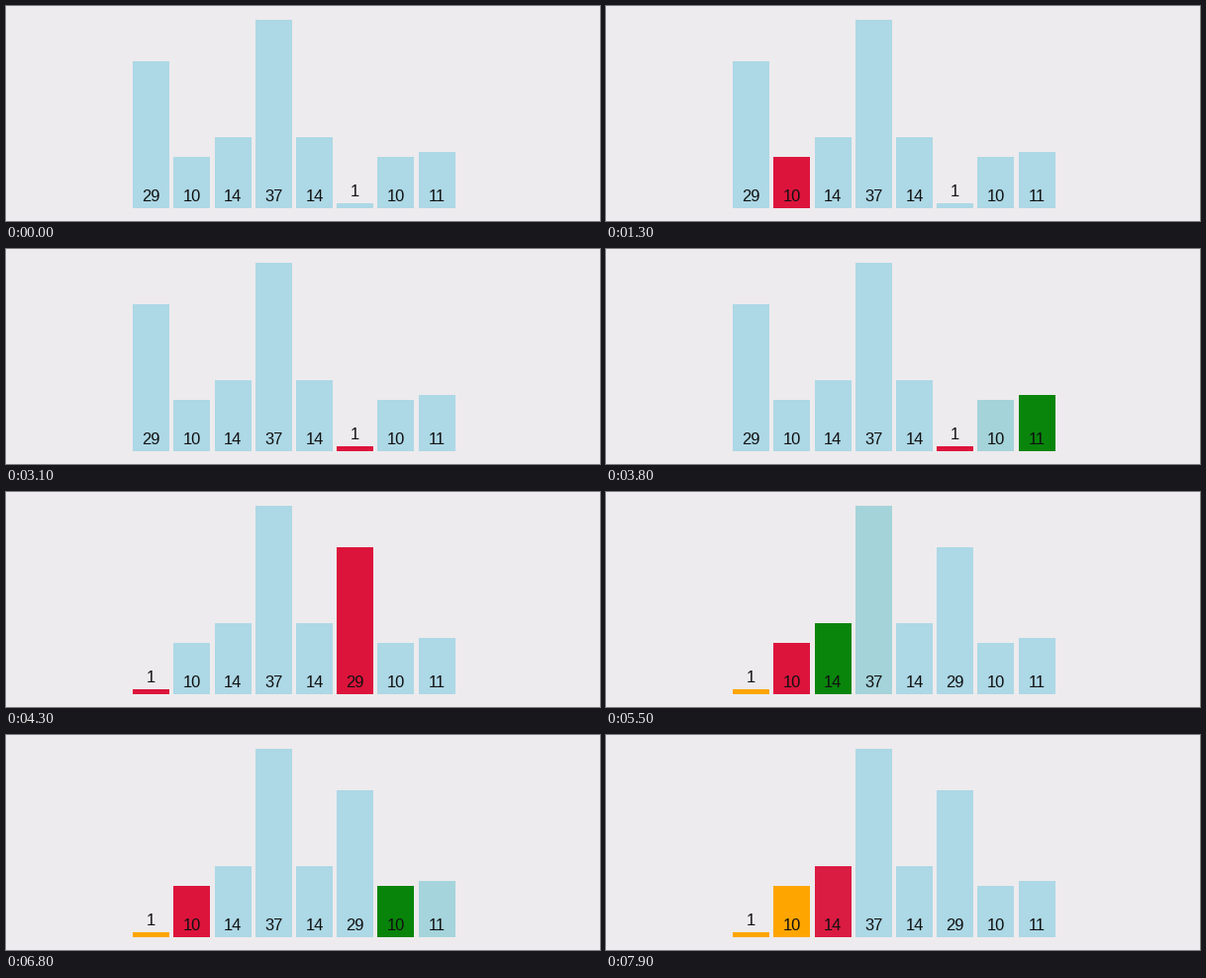
A matplotlib script for the animation above (8 s loop, 600 px wide and 218 px high).

```python
import numpy as np
import matplotlib.pyplot as plt
from matplotlib.animation import FuncAnimation
from matplotlib.colors import to_rgb
from matplotlib.patches import Rectangle

W, H, DPI = 600, 218, 100
FRAMES, INTERVAL = 80, 100
VALUES = [29, 10, 14, 37, 14, 1, 10, 11]
LEFT, PITCH, BAR_W, BASE, UNIT = 128.2, 41.2, 37, 204.7, 5.143
PLAIN, MINIMUM, CHECKED, SORTED = map(
    to_rgb, ("lightblue", "crimson", "green", "orange"))

# Pace of the algorithm: state number reached at each time in ms
TIMES = [260, 1290, 3100, 4290, 5425, 6704, 7990]
REACHED = [0, 3, 8, 11, 14, 18, 21]


def selection_sort_states(values):
    """Slots and colours of every bar after each step of the sort."""
    n = len(values)
    order = list(range(n))
    colors = [PLAIN] * n
    states = []

    def push():
        slots = [order.index(bar) for bar in range(n)]
        states.append((np.array(slots, float), np.array(colors)))

    push()
    for i in range(n - 1):
        low = i
        colors[order[low]] = MINIMUM
        push()
        for j in range(i + 1, n):
            colors[order[j]] = CHECKED
            push()
            colors[order[j]] = PLAIN
            if values[order[j]] < values[order[low]]:
                colors[order[low]] = PLAIN
                low = j
                colors[order[low]] = MINIMUM
                push()
        if low != i:
            colors[order[i]] = MINIMUM
            order[i], order[low] = order[low], order[i]
            push()
            colors[order[low]] = PLAIN
        colors[order[i]] = SORTED
        push()
    return states


def ease(x):
    return 4 * x**3 if x < 0.5 else 1 - 4 * (1 - x)**3


STATES = selection_sort_states(VALUES)

fig = plt.figure(figsize=(W / DPI, H / DPI), dpi=DPI, facecolor="#edebed")
ax = fig.add_axes([0, 0, 1, 1])
ax.set(xlim=(0, W), ylim=(H, 0))
ax.axis("off")

bars, labels = [], []
for k, value in enumerate(VALUES):
    height = value * UNIT
    bars.append(ax.add_patch(Rectangle(
        (0, BASE - height), BAR_W, height, lw=0, zorder=k + 1)))
    labels.append(ax.text(
        0, 198 if height > 15 else 193, str(value), ha="center",
        va="baseline", family="Liberation Sans", fontsize=16.5 * 72 / DPI,
        color="#111111", zorder=k + 1.5))


def draw(frame):
    progress = np.interp(frame * INTERVAL, TIMES, REACHED)
    step = int(progress)
    mix = ease(progress - step)
    (slots0, colors0), (slots1, colors1) = STATES[step:step + 2]
    xs = LEFT + PITCH * (slots0 + (slots1 - slots0) * mix)
    colors = colors0 + (colors1 - colors0) * mix
    for bar, label, x, color in zip(bars, labels, xs, colors):
        bar.set_x(x)
        bar.set_facecolor(np.clip(color, 0, 1))
        label.set_x(x + BAR_W / 2)
    return bars + labels


anim = FuncAnimation(fig, draw, frames=FRAMES, interval=INTERVAL,
                     repeat=True, repeat_delay=0)
plt.show()
```
